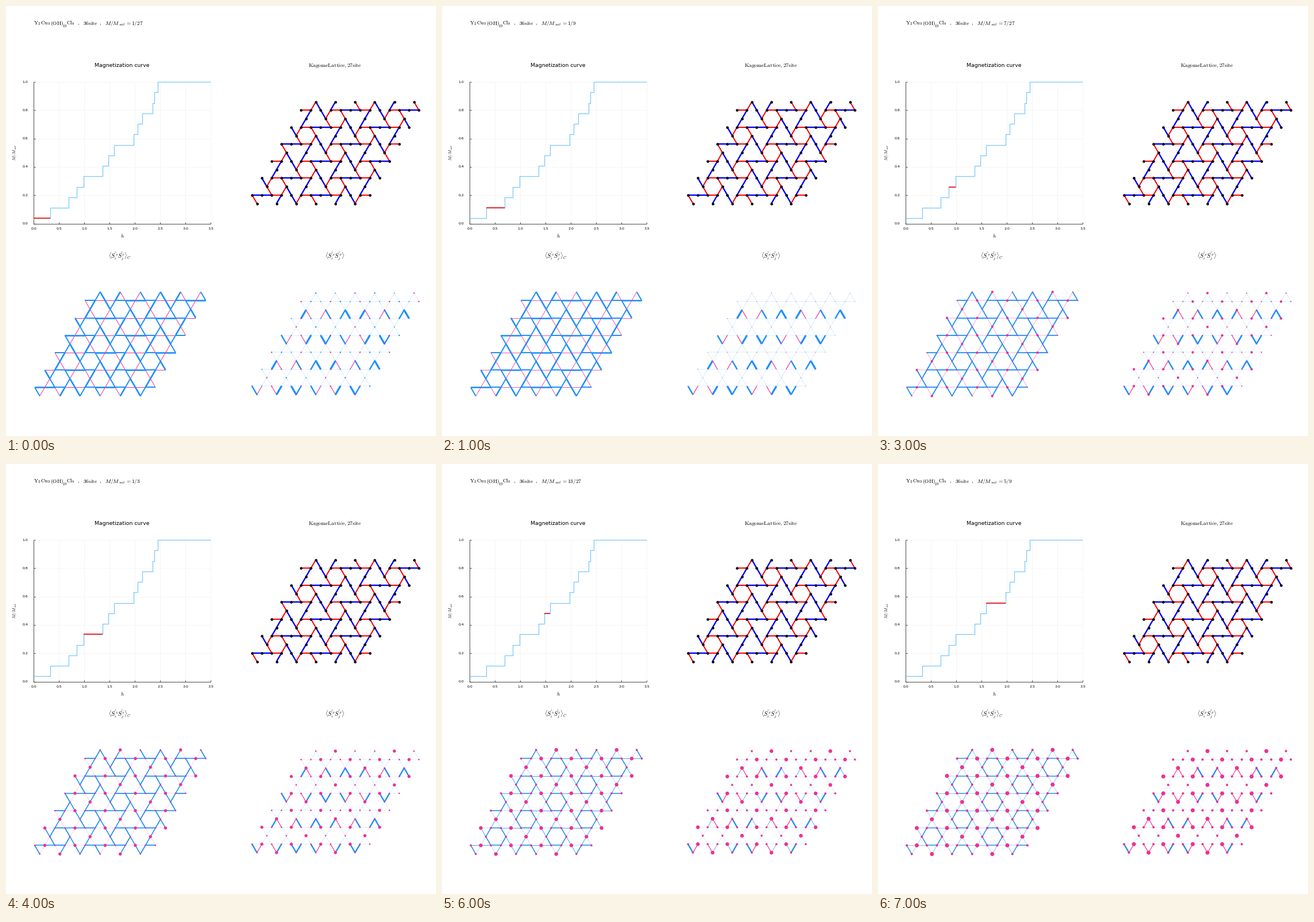
Animation of 748x748 px, one loop 8 s. Source, as a matplotlib script:

```python
import numpy as np
import matplotlib.pyplot as plt
from matplotlib.animation import FuncAnimation
from matplotlib.collections import LineCollection

SIZE, DPI = 748, 88
PT = 72 / DPI
BLUE, PINK = "#1e90ff", "#f03090"
plt.rcParams["mathtext.fontset"] = "cm"
plt.rcParams["font.family"] = "DejaVu Sans"

LEVELS = ["1/27", "1/9", "5/27", "7/27", "1/3", "11/27", "13/27", "5/9"]
STEPS = [0, .32, .685, .845, .98, 1.36, 1.475, 1.583, 1.975,
         2.06, 2.14, 2.345, 2.385, 2.45, 3.5]

# Per level: widths for (ring, strong, weak) bonds; negative means pink.
ZZ = [(2.0, 2.7, -1.0), (2.0, 2.6, -.8), (1.9, 2.4, -.55), (1.8, 1.9, -.4),
      (1.8, 1.6, -.2), (1.7, 1.1, .15), (1.6, .8, .3), (1.5, .55, .35)]
XX = [(2.4, 3.3, -1.1), (2.5, 3.3, -1.2), (2.6, 3.1, -1.2), (2.5, 2.7, -1.2),
      (2.4, 2.4, -1.2), (2.4, 1.8, -1.2), (2.4, .7, -1.2), (2.4, -1.1, -1.2)]
# Dot radii for (polarised, ring) sites.
DOTS = [(.9, 1.2), (.6, .5), (1.0, .8), (2.1, 1.0),
        (2.7, 1.3), (3.0, 1.6), (3.2, 1.8), (3.5, 2.0)]


def polarised(c, y):
    """Sites between the rings; odd y are full rows, even y the apex rows."""
    if y % 2:
        return c % 3 == 1
    return c % 6 == (2.5 if y % 4 == 0 else 5.5)


def bond_kind(a, b):
    """0 ring, 1 strong, 2 weak."""
    if not (polarised(*a) or polarised(*b)):
        return 0
    c, y = a if polarised(*a) else b
    rising = (b[0] - a[0]) * (b[1] - a[1]) < 0
    flat = a[1] == b[1]
    if y % 2 == 0:
        return 1 if rising else 2
    along = c % 6 == (4 if y % 4 == 1 else 1)
    if flat:
        return 1 if along else 2
    return 2 if rising or along else 1


def build():
    rows = [(5 - k + i, 2 * k + 1) for k in range(6) for i in range(13)]
    tips = [(6.5 - r + 2 * i, 2 * r) for r in range(7) for i in range(6)]
    known = set(rows)
    bonds = [((c, y), (c + 1, y)) for c, y in rows if (c + 1, y) in known]
    for c, y in tips:
        for dx in (-.5, .5):
            for dy in (-1, 1):
                if (c + dx, y + dy) in known:
                    bonds.append(((c, y), (c + dx, y + dy)))
    return rows + tips, bonds


sites, bonds = build()
kinds = [bond_kind(a, b) for a, b in bonds]
big = np.array([polarised(*s) for s in sites])


def is_leg(a, b):
    return (a[1] in (2, 8) and b[1] == a[1] + 1) or \
           (a[1] in (6, 12) and b[1] == a[1] - 1)


def left_half(c, y):
    """Ring site lying on the left side of its ring."""
    centre = 2.5 if (y // 2) % 2 else 5.5
    if y % 2:
        return c % 3 == 2
    return (c - centre) % 6 == 5


legs = [is_leg(a, b) for a, b in bonds]
mixed = [PINK if not g and left_half(*s) else BLUE for s, g in zip(sites, big)]

fig = plt.figure(figsize=(SIZE / DPI, SIZE / DPI), dpi=DPI, facecolor="white")
ax = fig.add_axes([0, 0, 1, 1])
ax.set_xlim(0, SIZE)
ax.set_ylim(SIZE, 0)
ax.axis("off")


def line(xs, ys, color, width, z=2, **kw):
    return ax.plot(xs, ys, color=color, lw=width * PT, zorder=z,
                   solid_capstyle="butt", **kw)[0]


def label(x, y, s, size, ha="center", va="center", **kw):
    return ax.text(x, y, s, fontsize=size * PT, ha=ha, va=va, **kw)


def lattice(x0, y0, dx, dy):
    def place(s):
        return x0 + dx * s[0], y0 + dy * s[1]
    segs = LineCollection([(place(a), place(b)) for a, b in bonds],
                          zorder=3, capstyle="butt")
    ax.add_collection(segs)
    dots = ax.scatter(*zip(*map(place, sites)), lw=0, zorder=5)
    return segs, dots


def area(r):
    return (2 * np.asarray(r) * PT) ** 2


# Header
for x, y, s, size in [(48.5, 32.6, r"$\mathrm{Y}_3$", 9.5),
                      (60, 32.6, r"$\mathrm{Cu}_9$", 9.5),
                      (76.6, 32.6, r"$\mathrm{(OH)}$", 9.5),
                      (98, 37, r"$19$", 6.6),
                      (105, 32.6, r"$\mathrm{Cl}_8$", 9.5),
                      (124, 32.6, r"$,$", 9.5),
                      (134, 32.6, r"$36\mathrm{site}$", 9.5),
                      (162, 32.6, r"$,$", 9.5),
                      (172, 32.6, r"$M/M_{\;sat}$", 9.5),
                      (208, 32.6, r"$=$", 9.5)]:
    label(x, y, s, size, ha="left", va="baseline")
level_text = label(218, 33.2, "", 9.5, ha="left", va="baseline")

# Magnetization curve
LEFT, RIGHT, TOP, BOTTOM = 48.5, 356, 132, 378.5


def px(h):
    return LEFT + (RIGHT - LEFT) * h / 3.5


def py(m):
    return BOTTOM + (TOP - BOTTOM) * m


label(202, 103.5, "Magnetization curve", 9.45)
for h in np.arange(8) / 2:
    line([px(h)] * 2, [TOP, BOTTOM], "#f3f3f3", .8, 1)
    line([px(h)] * 2, [BOTTOM, BOTTOM - 3], "#222222", .8)
    label(px(h), 387.3, f"{h:.1f}", 6.3)
for m in np.arange(6) / 5:
    line([LEFT, RIGHT], [py(m)] * 2, "#f3f3f3", .8, 1)
    line([LEFT, LEFT + 3], [py(m)] * 2, "#222222", .8)
    label(38.5, py(m), f"{m:.1f}", 6.3, ha="right")
line([LEFT, LEFT, RIGHT], [TOP, BOTTOM, BOTTOM], "#222222", .8)
label(202, 399, "$h$", 8.5)
label(15.5, 255, r"$M/M_{\,sat}$", 7.6, rotation=90)

heights = [(2 * i + 1) / 27 for i in range(14)]
line(px(np.repeat(STEPS, 2)[1:-1]), py(np.repeat(heights, 2)), "#74c6ff", 1.2, 3)
marker = line([], [], "#f01010", 1.7, 4)

# Coupling map
label(572.5, 104, r"$\mathrm{KagomeLattice},27\mathrm{site}$", 9.5)
segs, dots = lattice(428, 166.5, 17.07, 14.75)
segs.set_color([("red", "blue", "#e2eee2")[k] for k in kinds])
segs.set_linewidth([(2.0 * PT, 2.4 * PT, .6 * PT)[k] for k in kinds])
dots.set_color("black")
dots.set_sizes([area(2.3)])

# Correlation maps
label(198, 435.5, r"$\langle \hat{S_i^z}\hat{S_j^z}\rangle_C$", 10)
label(572.5, 435.5, r"$\langle \hat{S_i^x}\hat{S_j^x}\rangle$", 10)
zz_segs, zz_dots = lattice(50, 497.3, 17.5, 15.1)
xx_segs, xx_dots = lattice(428, 499.4, 17.07, 14.72)


def style(segs, widths):
    segs.set_color([BLUE if w > 0 else PINK for w in widths])
    segs.set_linewidth([abs(w) * PT for w in widths])


def draw(n):
    level_text.set_text(f"${LEVELS[n]}$")
    marker.set_data(px(np.array(STEPS[n:n + 2])), [py(heights[n])] * 2)
    style(zz_segs, [ZZ[n][k] for k in kinds])
    style(xx_segs, [XX[n][k] if leg else .16 for k, leg in zip(kinds, legs)])
    sizes = area(np.where(big, *DOTS[n]))
    for dots in (zz_dots, xx_dots):
        dots.set_sizes(sizes)
        dots.set_color(mixed if n == 0 else PINK)
    zz_dots.set_visible(n > 0)
    return level_text, marker, zz_segs, zz_dots, xx_segs, xx_dots


anim = FuncAnimation(fig, draw, frames=len(LEVELS), interval=1000,
                     repeat=True, repeat_delay=0)
plt.show()
```
